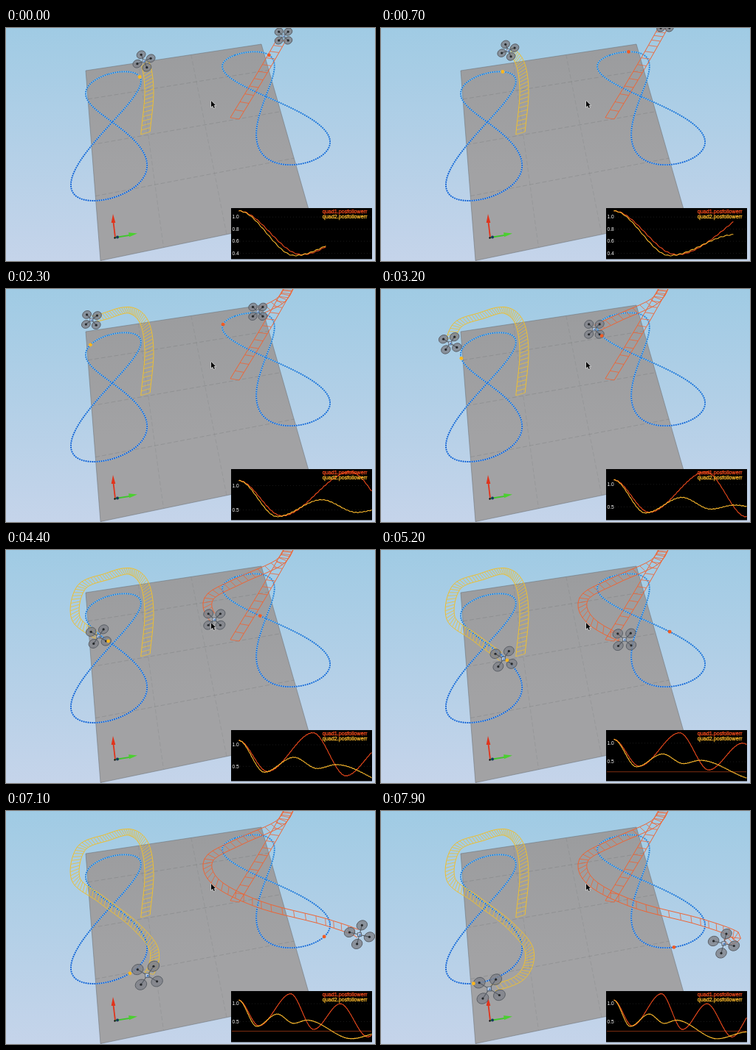
An HTML page with a canvas for the animation above (8000 ms loop, 500x317 px).

```html
<!DOCTYPE html>
<html lang="en">
<head>
<meta charset="utf-8">
<title>Two drones following figure-eight paths</title>
<style>
  html, body { margin: 0; width: 100%; height: 100%; overflow: hidden; background: #b2d0e8; }
  canvas { display: block; width: 500px; height: 317px; }
</style>
</head>
<body>
<canvas id="stage" width="500" height="317"></canvas>
<script>
const ctx = document.getElementById('stage').getContext('2d');
const LOOP = 8000, STEP = 100, TAU = Math.PI * 2;
const START = -1.8, BEAT = 0.9; // first flight point and time between points, in s

// track: eight points at equal phase; flight: points at equal times.
// turn: yaw before and after (degrees), start and end time (s).
const quads = [
  {
    color: '#ecbf34', dot: '#ffb81c', rung: 0.09, turn: [67, 33, 1.4, 3.2],
    track: [[138, 63], [108, 90], [144, 128], [191, 184], [141, 232], [88, 211], [144, 128], [182, 68]],
    flight: [[189, 143], [194, 85], [187, 45], [167, 29], [137, 36], [102, 51],
      [95, 93], [130, 121], [175, 156], [201, 191], [188, 227], [134, 246]]
  },
  {
    color: '#ee6434', dot: '#f25a22', rung: 0.15, turn: [45, 14, 5, 6.2],
    track: [[310, 37], [296, 60], [352, 93], [432, 139], [411, 182], [345, 168], [352, 93], [358, 38]],
    flight: [[310, 123], [348, 60], [376, 11], [385, -6], [370, 17], [316, 42],
      [275, 66], [286, 98], [346, 128], [433, 151], [481, 170], [458, 183]]
  }
];

// Following error: its turning points as [chart time (s), value].
const errors = [
  { name: 'quad1.posfollowerr', color: '#f04a1c',
    turns: [[0, 1.1], [1.35, 0.38], [3.5, 1.28], [5.05, 0.28], [6.85, 1], [8.7, 0.07], [10.3, 0.8]] },
  { name: 'quad2.posfollowerr', color: '#fbb92c',
    turns: [[0, 1.1], [1.2, 0.365], [2.6, 0.71], [3.7, 0.45], [4.6, 0.54], [7.6, 0.02], [9.8, 0.21]] }
];

const clamp = (v, lo, hi) => Math.min(hi, Math.max(lo, v));
const ease = s => s * s * (3 - 2 * s);
const mix = (p, q, s) => [p[0] + (q[0] - p[0]) * s, p[1] + (q[1] - p[1]) * s];

// Catmull-Rom spline through evenly timed points.
function flightAt(q, t) {
  const pts = q.flight, u = (t - START) / BEAT;
  const i = clamp(Math.floor(u), 0, pts.length - 2), s = u - i;
  const p = pts[i], n = pts[i + 1];
  const o = pts[i - 1] || mix(n, p, 2), r = pts[i + 2] || mix(p, n, 2);
  return [0, 1].map(k => p[k] + s / 2 * (n[k] - o[k]
    + s * (2 * o[k] - 5 * p[k] + 4 * n[k] - r[k] + s * (3 * (p[k] - n[k]) + r[k] - o[k]))));
}

// Trigonometric interpolation round the closed track, u in points.
function trackAt(q, u) {
  const n = q.track.length, sum = [0, 0];
  q.track.forEach((p, i) => {
    const x = (u - i) * TAU / n, h = Math.tan(x / 2);
    const w = Math.abs(h) < 1e-6 ? 1 : Math.sin(n * x / 2) / (n * h);
    sum[0] += w * p[0];
    sum[1] += w * p[1];
  });
  return sum;
}

function errorAt(turns, t) {
  const i = Math.max(1, turns.findIndex(p => p[0] >= t));
  const [t0, v0] = turns[i - 1], [t1, v1] = turns[i];
  return v0 + (v1 - v0) * ease((t - t0) / (t1 - t0)) + 0.006 * Math.sin(t * 50);
}

function line(points, color, width = 1) {
  ctx.beginPath();
  points.forEach(p => ctx.lineTo(p[0], p[1]));
  ctx.strokeStyle = color;
  ctx.lineWidth = width;
  ctx.stroke();
}

function shape(points, color) {
  ctx.beginPath();
  points.forEach(p => ctx.lineTo(p[0], p[1]));
  ctx.closePath();
  ctx.fillStyle = color;
  ctx.fill();
}

function disc(x, y, r, color) {
  ctx.beginPath();
  ctx.arc(x, y, r, 0, TAU);
  ctx.fillStyle = color;
  ctx.fill();
}

function fade(y0, y1, from, to) {
  const g = ctx.createLinearGradient(0, y0, 0, y1);
  g.addColorStop(0, from);
  g.addColorStop(1, to);
  return g;
}

function drawScene() {
  ctx.fillStyle = fade(0, 317, '#a0cbe4', '#c5d4ea');
  ctx.fillRect(0, 0, 500, 317);

  const a = [108, 58], b = [346, 22], c = [413, 257], d = [128, 316.5];
  shape([a, b, c, d], fade(22, 200, '#9b9c9e', '#a2a2a4'));
  ctx.setLineDash([6, 3]);
  for (const s of [0.15, 0.39, 0.66]) line([mix(a, d, s), mix(b, c, s)], 'rgba(80,84,88,.2)');
  for (const s of [0.3, 0.6]) line([mix(a, b, s), mix(d, c, s)], 'rgba(80,84,88,.13)');
  ctx.setLineDash([]);
  line([d, a, b, c, d], 'rgba(100,106,112,.5)');
}

function drawTrack(q) {
  const points = [];
  for (let u = 0; u <= q.track.length; u += 0.05) points.push(trackAt(q, u));
  line(points, '#84c2ea', 1.5);
  ctx.setLineDash([1.5, 1.5]);
  line(points, fade(35, 210, '#1f80d8', '#0a50d2'), 1.9);
  ctx.setLineDash([]);
}

function drawAxes() {
  line([[148, 285], [145.5, 264]], '#e0341c', 1.8);
  shape([[145, 253], [148.3, 265], [142.7, 265]], '#e0341c');
  line([[148, 285], [168, 281.8]], '#3fc52c', 1.8);
  shape([[178, 279.5], [167, 284.3], [166, 278.3]], '#4bd02f');
  disc(151, 284.5, 2, '#17395e');
  disc(147.5, 285.5, 1.2, '#111');
}

// Ribbon edges at a time; its right side leads a little, which slants the rungs.
function ribbonAt(q, time) {
  const p = flightAt(q, time), m = flightAt(q, time - 0.06), n = flightAt(q, time + 0.06);
  const dx = n[0] - m[0], dy = n[1] - m[1], len = Math.hypot(dx, dy) || 1;
  const tx = dx / len, ty = dy / len, w = 4 + 2 * Math.abs(ty);
  const side = [(0.4 * tx - ty) * w, (0.4 * ty + tx) * w];
  return [[p[0] - side[0], p[1] - side[1]], [p[0] + side[0], p[1] + side[1]]];
}

function drawTrail(q, t) {
  const left = [], right = [], end = t - 0.08;
  for (let time = START; time < end; time += q.rung) {
    const [l, r] = ribbonAt(q, time);
    left.push(l);
    right.push(r);
    line([l, r], q.color, 0.8);
  }
  const [l, r] = ribbonAt(q, end);
  line([...left, l], q.color);
  line([...right, r], q.color);
}

function drawGoal(q, t) {
  const [x, y] = trackAt(q, 0.65 * t - 0.95);
  disc(x, y, 2.4, q.dot);
}

function drawQuad(q, t) {
  const [x, y] = flightAt(q, t);
  const [from, to, t0, t1] = q.turn;
  const yaw = (from + (to - from) * ease(clamp((t - t0) / (t1 - t0), 0, 1))) * TAU / 360;
  const arm = 8.5 + 0.032 * y; // lower on the stage is nearer
  const r = 2.8 + arm / 3;
  const rotors = [0, 1, 2, 3].map(i => {
    const angle = yaw + i * TAU / 4;
    return [x + arm * Math.cos(angle), y + arm * 0.95 * Math.sin(angle)];
  });
  for (const [rx, ry] of rotors) {
    ctx.beginPath();
    ctx.ellipse(rx, ry, r, r * 0.85, -0.5, 0, TAU);
    ctx.fillStyle = 'rgba(128,131,138,.82)';
    ctx.fill();
    ctx.strokeStyle = '#5a5f66';
    ctx.lineWidth = 1;
    ctx.stroke();
  }
  for (const [rx, ry] of rotors) {
    line([[x, y], [rx, ry]], '#565c64', 1.1);
    disc(rx, ry, 1.6, '#25282b');
  }
  const s = r * 0.4;
  ctx.fillStyle = '#5a6673';
  ctx.fillRect(x - s, y - s, s * 2, s * 2);
  ctx.fillStyle = '#c3d2e8';
  ctx.fillRect(x - s * 0.7, y - s * 0.7, s * 1.3, s * 1.3);
  ctx.fillStyle = '#3f78c4';
  ctx.fillRect(x - s * 0.2, y - s * 0.2, s * 0.7, s * 0.7);
}

function drawCursor() {
  const tip = [[278, 99], [278, 107.5], [280, 105.8], [281.5, 109], [283, 108.3], [281.6, 105.2], [284, 105]];
  line([...tip, tip[0]], 'rgba(240,240,240,.8)', 1.2);
  shape(tip, '#080808');
}

function drawChart(t) {
  const now = t + 1.87, scale = Math.min(63, 180 / now);
  const curves = errors.map(e => Array.from({ length: 181 }, (_, i) => {
    const time = now * i / 180;
    return [315.5 + time * scale, errorAt(e.turns, time)];
  }));
  const values = curves.flat().map(p => p[1]);
  const min = Math.min(...values), max = Math.max(...values);
  const toY = v => 310 - (v - min) / (max - min) * 61.5;

  ctx.fillStyle = '#000';
  ctx.fillRect(305, 245, 191, 69.5);
  ctx.font = '6.6px "Liberation Sans", Arial, sans-serif';
  ctx.textAlign = 'left';
  const step = max - min < 0.8 ? 0.2 : 0.5;
  for (let v = 1; v > min && v > 0.1; v -= step) {
    const y = toY(v);
    ctx.setLineDash([1, 3]);
    line([[317, y], [495, y]], '#262626', 0.7);
    ctx.setLineDash([]);
    ctx.fillStyle = '#fff';
    ctx.fillText(v.toFixed(1), 306.5, y + 2.2);
  }
  if (min < 0.23) line([[306, toY(0.23)], [495, toY(0.23)]], '#8e3414', 0.9);
  curves.forEach((points, i) => line(points.map(p => [p[0], toY(p[1])]), errors[i].color, 1.1));

  ctx.font = '7.2px "Liberation Sans", Arial, sans-serif';
  ctx.textAlign = 'right';
  ctx.lineWidth = 0.3;
  errors.forEach((e, i) => {
    const y = 251.8 + i * 7.6;
    ctx.fillStyle = ctx.strokeStyle = e.color;
    ctx.fillText(e.name, 489.5, y);
    ctx.strokeText(e.name, 489.5, y);
  });
}

function draw(t) {
  drawScene();
  quads.forEach(drawTrack);
  drawAxes();
  for (const q of quads) drawTrail(q, t);
  for (const q of quads) drawQuad(q, t);
  for (const q of quads) drawGoal(q, t);
  drawCursor();
  drawChart(t);
}

const begin = performance.now();
function tick() {
  const ms = (performance.now() - begin) % LOOP;
  draw(Math.floor(ms / STEP) * STEP / 1000);
  requestAnimationFrame(tick);
}
tick();
</script>
</body>
</html>
```
